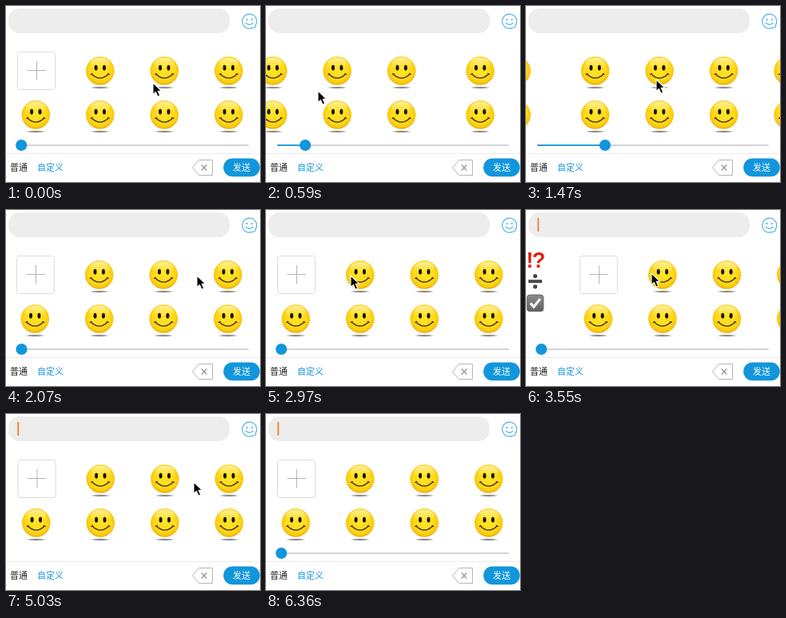
Recreate the animation shown at these times as an HTML page. Size 318 by 220 pixels, loop 6.46 s.

```html
<!DOCTYPE html>
<html lang="zh">
<head>
<meta charset="utf-8">
<style>
  html, body { margin: 0; width: 100%; height: 100%; overflow: hidden; background: #fff; }
  svg { display: block; width: 318px; height: 220px; }
  text { font-family: "Noto Sans CJK SC", "Noto Sans CJK", "Noto Sans", sans-serif; font-size: 11px; }
  .sym { font-family: "DejaVu Sans", sans-serif; font-size: 20px; font-weight: bold; text-anchor: middle; }
  .bang { font-family: "Liberation Sans", sans-serif; font-size: 27px; letter-spacing: -1.5px; }
</style>
</head>
<body>
<svg viewBox="0 0 318 220">
  <defs>
    <radialGradient id="skin" cx=".5" cy=".45" r=".56">
      <stop offset="0" stop-color="#ffe42a"/>
      <stop offset=".65" stop-color="#ffd91a"/>
      <stop offset=".88" stop-color="#f8c60c"/>
      <stop offset="1" stop-color="#dfa000"/>
    </radialGradient>
    <linearGradient id="gloss" x2="0" y2="1">
      <stop offset="0" stop-color="#fffbd0" stop-opacity=".75"/>
      <stop offset="1" stop-color="#fff27a" stop-opacity="0"/>
    </linearGradient>
    <radialGradient id="shade">
      <stop offset="0" stop-color="#444" stop-opacity=".8"/>
      <stop offset=".6" stop-color="#666" stop-opacity=".55"/>
      <stop offset="1" stop-color="#999" stop-opacity="0"/>
    </radialGradient>
    <linearGradient id="box" x2="0" y2="1">
      <stop offset="0" stop-color="#8c8c8c"/>
      <stop offset="1" stop-color="#5e5e5e"/>
    </linearGradient>
    <g id="smiley">
      <ellipse cy="21" rx="13" ry="1.7" fill="url(#shade)"/>
      <circle r="17.8" fill="url(#skin)"/>
      <ellipse cy="-9" rx="12.5" ry="7.5" fill="url(#gloss)"/>
      <ellipse cx="-5.2" cy="-3.8" rx="2" ry="3.4" fill="#1c1400"/>
      <ellipse cx="5.2" cy="-3.8" rx="2" ry="3.4" fill="#1c1400"/>
      <path d="M-10.5 4Q0 14.4 10.5 4M-11.4 4.6L-9.8 3.4M11.4 4.6L9.8 3.4" fill="none" stroke="#33240a" stroke-width="1.2" stroke-linecap="round"/>
    </g>
  </defs>
  <rect width="318" height="220" fill="#fff"/>
  <g id="pages"></g>
  <rect x="3" y="3" width="277" height="31" rx="14" fill="#ededed"/>
  <rect id="caret" x="14.3" y="10" width="1.9" height="17" fill="#f0842e"/>
  <g fill="none" stroke="#46aee3" stroke-width="1.15" stroke-linecap="round">
    <path d="M312.6 23.6A9 9 0 1 0 308.5 27.3M312.6 23.6Q312.8 27.2 308.5 27.3M300.4 21.2Q304.8 25.6 309.2 21.2"/>
    <path d="M301.7 17v.2M307.9 17v.2" stroke-width="1.9"/>
  </g>
  <g id="slider">
    <rect x="14" y="173.2" width="290" height="1.8" rx=".9" fill="#cdcdcd"/>
    <rect id="fill" x="14" y="173.2" height="1.8" rx=".9" fill="#1296db"/>
    <circle id="knob" cy="174" r="7.1" fill="#1296db"/>
  </g>
  <path d="M0 184.5H318" stroke="#ebebeb"/>
  <text id="tabA" x="5" y="206">普通</text>
  <text id="tabB" x="39" y="206">自定义</text>
  <path d="M233.5 202L241.5 192.5H258.5V211.5H241.5Z" fill="none" stroke="#b5b5b5" stroke-linejoin="round"/>
  <path d="M244.8 198.6L251.4 205.4M251.4 198.6L244.8 205.4" stroke="#999" stroke-width="1.4"/>
  <rect x="272.2" y="190.5" width="45.6" height="22.7" rx="11.3" fill="#1296db"/>
  <text x="295" y="206" fill="#fff" text-anchor="middle">发送</text>
  <path id="mouse" d="M0 0V14.6L3.4 11.5L5.9 17.2L8.7 16L6.2 10.4H10.8Z" fill="#000" stroke="#fff" stroke-width="1.1" stroke-linejoin="round"/>
</svg>
<script>
const $ = id => document.getElementById(id);
const LOOP = 6460, STEP = 147.7, PITCH = 340, BLUE = '#1296db';
const RED = '#e0200f', INK = '#484848';

function customPage(page) {
  let out = '';
  for (let i = 0; i < 8; i++) {
    out += page || i
      ? `<use href="#smiley" x="${37.3 + (i % 4) * 80.5}" y="${i < 4 ? 81 : 136}"/>`
      : '<rect x="14.5" y="57.5" width="47" height="47" rx="3" fill="#fff" stroke="#dcdcdc"/>' +
        '<path d="M26.5 80.5H50M38.5 69V92.5" stroke="#b4b4b4"/>';
  }
  return `<g transform="translate(${page * PITCH})">${out}</g>`;
}

const sym = (s, color) => `<text class="sym" y="7" fill="${color}">${s}</text>`;
const bang = (s, color = RED) => `<text class="sym bang" y="9.7" fill="${color}">${s}</text>`;
const bar = `<rect x="-8.5" y="-2" width="17" height="4" fill="${INK}"/>`;
const upright = `<g transform="rotate(90)">${bar}</g>`;
const dots = `<circle cy="-6.6" r="2.6" fill="${INK}"/><circle cy="6.6" r="2.6" fill="${INK}"/>`;
const check = '<rect x="-10.3" y="-10.3" width="20.6" height="20.6" rx="3.5" fill="url(#box)" stroke="#666"/>' +
  '<path d="M-6 0L-1.8 4.8L6.2 -5.4" fill="none" stroke="#eee" stroke-width="3.4"/>';

const symbols = [
  sym('$', '#3c9a50'), sym('¥', '#3c9a50'), sym('©', INK), sym('®', INK),
  sym('™', INK), sym('✖', RED), bang('!!'), bang('!?'),
  bang('!'), bang('?'), bang('!', '#bbb'), bang('?', '#bbb'),
  `<g transform="rotate(45)">${bar + upright}</g>`, bar + upright, bar, bar + dots,
  sym('♠', '#222'), sym('♥', RED), sym('♣', '#222'), sym('♦', RED),
  sym('✿', '#e88aa8'), sym('★', RED), sym('✔', INK), check
];
const symbolPage = `<g transform="translate(${-PITCH})">` + symbols.map((s, i) =>
  `<g transform="translate(${20.5 + (i % 8) * 39.7} ${62 + (i >> 3) * 27.2})">${s}</g>`).join('') + '</g>';

$('pages').innerHTML = symbolPage + [0, 1, 2].map(customPage).join('');

const clamp = (v, lo, hi) => Math.min(hi, Math.max(lo, v));
function ease(k, from, to) {
  const x = clamp((k - from) / (to - from), 0, 1);
  return x * x * (3 - 2 * x);
}

// Four swipes: next page, back, over to the symbols, back again
const scroll = k => PITCH *
  (ease(k, 1.5, 8.11) - ease(k, 8.68, 14.18) - ease(k, 22, 30) + ease(k, 31, 34.07));

// Pointer stops: step, x, y
const stops = [[0, 184, 96], [4, 65, 106], [10, 163, 92], [14, 239, 82], [20, 106, 82],
  [24, 157, 79], [30, 290, 86], [34, 235, 85], [42, 252, 222]];
const pointer = (k, axis) => stops.reduce((v, stop, i) =>
  i ? v + (stop[axis] - stops[i - 1][axis]) * ease(k, stops[i - 1][0], stop[0]) : v, stops[0][axis]);

// The caret blinks, but stays lit during the long swipe
const caretOn = k => k < 32
  ? Math.floor((clamp(k, 2, 23) - 2) / 3) % 2 === 1
  : Math.floor((k - 34) / 3.5) % 2 === 0;

function draw(ms) {
  const k = Math.floor((ms % LOOP + 10) / STEP);
  const s = scroll(k);
  const knob = 19.2 + Math.max(0, s) / PITCH * 93.3;
  const symbolsOn = s < -PITCH / 2;
  $('pages').setAttribute('transform', `translate(${-s})`);
  $('knob').setAttribute('cx', knob);
  $('fill').setAttribute('width', knob - 14);
  $('slider').style.display = k > 25 && k < 35 ? 'none' : '';
  $('tabA').setAttribute('fill', symbolsOn ? BLUE : '#222');
  $('tabB').setAttribute('fill', symbolsOn ? '#222' : BLUE);
  $('caret').style.display = caretOn(k) ? '' : 'none';
  $('mouse').setAttribute('transform', `translate(${pointer(k, 1)} ${pointer(k, 2)})`);
}

const start = performance.now();
(function tick() {
  draw(Math.max(0, performance.now() - start));
  requestAnimationFrame(tick);
})();
</script>
</body>
</html>
```
